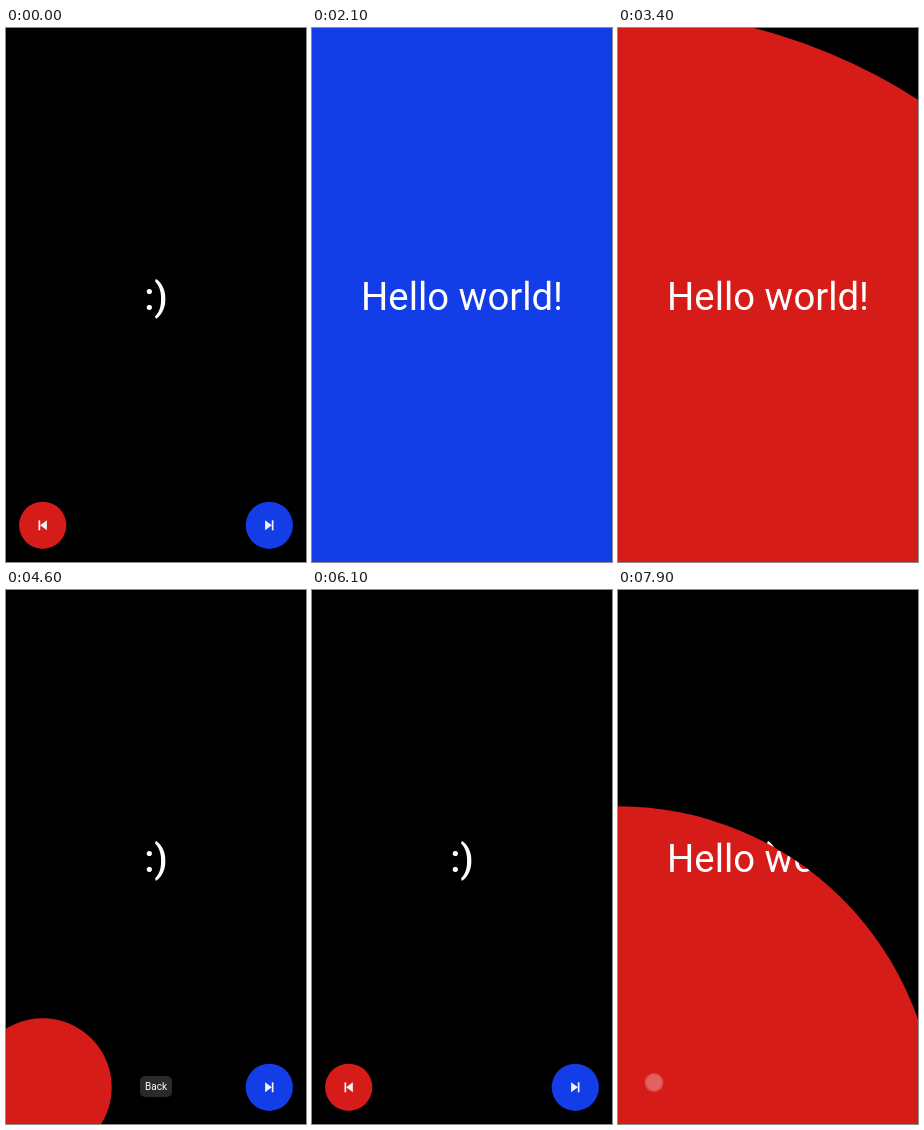
Write an HTML page with a canvas that moves like this. It is 300 by 534 pixels and loops after 8000 ms.

```html
<!DOCTYPE html>
<html lang="en">
<head>
<meta charset="utf-8">
<style>
  html, body { margin: 0; height: 100%; overflow: hidden; background: #000; }
  canvas { display: block; width: 300px; height: 534px; }
</style>
</head>
<body>
<canvas id="stage" width="300" height="534"></canvas>
<script>
const ctx = document.getElementById('stage').getContext('2d');
const W = 300, H = 534, LOOP = 8000, OPEN = 500, CLOSE = 300;
const BUTTON_Y = 497.3, BUTTON_R = 23.6, TITLE_Y = 281.8, TITLE_SIZE = 38.3;

const red = { color: '#d61c19', x: 36.7, corner: 0, touch: 36, dir: 1 };
const blue = { color: '#133de7', x: 263.3, corner: W, touch: 264, dir: -1 };

// Each visit to a page: side, start of opening, start of closing
const visits = [
  [blue, 1500, 2290],
  [red, 3060, 4388],
  [blue, 5003, 5790],
  [red, 6303, 7290],
  [red, 7748, Infinity]
];

const clamp = v => Math.min(1, Math.max(0, v));
const easeOut = t => 1 - (1 - t) ** 2;

function disc(x, y, r, color) {
  ctx.beginPath();
  ctx.arc(x, y, r, 0, Math.PI * 2);
  ctx.fillStyle = color;
  ctx.fill();
}

function label(text, y, size, weight = 400) {
  ctx.font = `${weight} ${size}px Roboto, sans-serif`;
  ctx.textAlign = 'center';
  ctx.fillStyle = '#fff';
  ctx.fillText(text, W / 2, y);
}

function button({ color, x, dir }) {
  disc(x, BUTTON_Y, BUTTON_R, color);
  ctx.save();
  ctx.translate(x, BUTTON_Y);
  ctx.scale(dir, 1);
  ctx.fillStyle = '#f2f2f2';
  ctx.fillRect(-4.2, -5, 1.7, 10);
  ctx.beginPath();
  ctx.moveTo(-2.6, 0);
  ctx.lineTo(4.2, -5);
  ctx.lineTo(4.2, 5);
  ctx.fill();
  ctx.restore();
}

function tooltip(alpha) {
  ctx.globalAlpha = alpha;
  ctx.beginPath();
  ctx.roundRect(134, 486, 32, 21, 5);
  ctx.fillStyle = '#2a2a2a';
  ctx.fill();
  label('Back', 500, 10);
  ctx.globalAlpha = 1;
}

function page(color, x, y, r) {
  ctx.save();
  disc(x, y, r, color);
  ctx.clip();
  label('Hello world!', TITLE_Y, TITLE_SIZE);
  ctx.restore();
}

function draw(t) {
  ctx.fillStyle = '#000';
  ctx.fillRect(0, 0, W, H);
  label(':)', TITLE_Y, TITLE_SIZE, 500);
  button(red);
  button(blue);
  if (t > 4300 && t < 4900) tooltip(clamp((4900 - t) / 100));

  for (const [side, open, close] of visits) {
    // Opens from the screen corner, closes into its button
    if (t >= open && t < close) {
      page(side.color, side.corner, H, 613 * easeOut(clamp((t - open) / OPEN)));
    } else if (t >= close && t < close + CLOSE) {
      const k = easeOut((t - close) / CLOSE);
      page(side.color, side.x, BUTTON_Y, 564 + (BUTTON_R - 564) * k);
    }
    if (t > open - 120 && t < open + 240) {
      disc(side.touch, 492.5, 9.5, 'rgba(255,255,255,.2)');
      disc(side.touch, 492.5, 8, 'rgba(255,255,255,.14)');
    }
  }
}

const start = performance.now();
function tick() {
  draw((performance.now() - start) % LOOP);
  requestAnimationFrame(tick);
}
tick();
</script>
</body>
</html>
```
